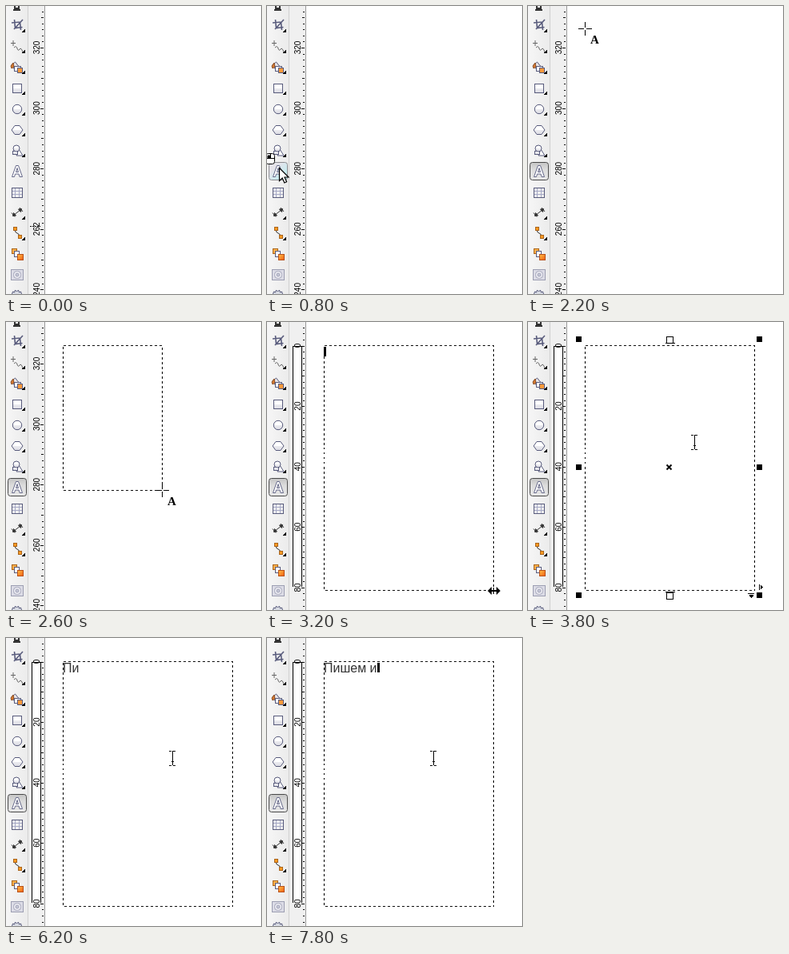
An HTML page for the animation above (8 s loop, 319 by 360 pixels).

```html
<!DOCTYPE html>
<html lang="ru">
<head>
<meta charset="utf-8">
<style>
html, body { margin: 0; width: 100%; height: 100%; overflow: hidden; background: #fff; }
svg { display: block; width: 319px; height: 360px; }
.crisp { shape-rendering: crispEdges; }
.icon { fill: none; stroke: #585b7c; }
.ruler text { font: 10px "Liberation Sans", Arial, sans-serif; text-anchor: middle; }
</style>
</head>
<body>
<svg viewBox="0 0 319 360">
  <defs>
    <linearGradient id="bar"><stop stop-color="#f6f6f6"/><stop offset="1" stop-color="#ebebeb"/></linearGradient>
    <linearGradient id="steel" x2="0" y2="1"><stop offset=".5" stop-color="#fff"/><stop offset=".5" stop-color="#ececf0"/><stop offset="1" stop-color="#dcdce4"/></linearGradient>
    <linearGradient id="orange" x2="1" y2="1"><stop stop-color="#ffc34a"/><stop offset="1" stop-color="#f05a10"/></linearGradient>
    <linearGradient id="hover" x2="1" y2="1"><stop offset=".3" stop-color="#e6e4ea"/><stop offset="1" stop-color="#b4f0f4"/></linearGradient>
    <linearGradient id="pressed" x2="0" y2="1"><stop stop-color="#c4c4c4"/><stop offset=".4" stop-color="#dcdcdc"/><stop offset="1" stop-color="#e8e8e8"/></linearGradient>
  </defs>
  <rect width="319" height="360" fill="#fff"/>
  <g class="crisp">
    <rect width="28" height="360" fill="url(#bar)"/>
    <rect x="27" width="1" height="360" fill="#d0d0d0"/>
    <rect x="28" width="20" height="360" fill="#f0f0f0"/>
    <rect x="48" width="1" height="360" fill="#999"/>
  </g>

  <g id="pageRuler" class="ruler"></g>
  <g id="frameRuler" class="ruler"></g>
  <path id="marker" class="crisp" d="M30 275.5h13" stroke="#000" stroke-dasharray="2 1"/>

  <rect id="toolBox" x="2.5" y="195.5" width="23" height="22" rx="3"/>
  <g class="icon">
    <path d="M11 0v3h5v-3M9 5h9" stroke="#333" stroke-width="2"/>
    <path d="M10.500 17l1 10.500 9-1M7 21l10.500-1 1 10M10 29l11-12" stroke-width="1.600"/>
    <path d="M6 46.500h6M9 43v7M10 52q3-3 4 1t3 1t4 4" stroke="#666"/>
    <path d="M6.500 74l5-4 4 5-5 4z" fill="#e8e4e6"/>
    <path d="M6 75l3-4 1 5-3 2z" fill="#d87a30" stroke="#8a5028"/>
    <rect x="10.500" y="75.500" width="8" height="6" fill="#fff"/>
    <rect x="14.500" y="77.500" width="6" height="6" fill="#ff9a3a"/>
    <rect x="8.500" y="97.500" width="11" height="11" fill="url(#steel)"/>
    <circle cx="14" cy="129" r="5.700" fill="url(#steel)"/>
    <path d="M11 149.500h6l4 5.500-4 5.500h-6l-4-5.500z" fill="url(#steel)"/>
    <path d="M16 179l5 8h-8z" fill="#fff"/>
    <rect x="8.500" y="181.500" width="6" height="4" fill="url(#steel)"/>
    <circle cx="13" cy="178" r="4" fill="url(#steel)"/>
    <path d="M7.500 213.500l5-14h3l5 14h-3.500l-1-3.500h-4.500l-1 3.500zM12.500 207.500h3l-1.500-5z" fill="#fff" stroke="#66698a"/>
    <path class="crisp" d="M7.500 231.500h13M7.500 235.500h13M11.500 228v12M16.500 228v12" stroke="#a6a9c6"/>
    <rect class="crisp" x="7.500" y="227.500" width="13" height="12"/>
    <path d="M9.500 261.500l9-7M7 258.500l4 5M17 252l4 5" stroke="#333"/>
    <path d="M8.500 262.500l1-4 3 3.500zM19.500 253.500l-1 4-3-3.500z" fill="#333" stroke="#333"/>
    <path d="M11 280q1 4 3 4t3 4" stroke="#333"/>
    <rect x="9.500" y="276.500" width="4" height="4" fill="#ff9a22" stroke="#a8641c"/>
    <rect x="15.500" y="286.500" width="4" height="4" fill="#ff9a22" stroke="#a8641c"/>
    <rect x="7.500" y="303.500" width="6" height="6" fill="#ffb04a" stroke="#a8641c"/>
    <rect x="10.500" y="306.500" width="6" height="7" fill="#fff"/>
    <rect x="14.500" y="310.500" width="7" height="7" fill="url(#orange)" stroke="#b85018"/>
    <rect x="6.500" y="329.500" width="15" height="13" fill="#dcdce6" stroke="#9c9eb2"/>
    <rect x="9.500" y="331.500" width="9" height="9" rx="4" fill="#ececf2" stroke="#a4a6ba"/>
    <circle cx="14" cy="336" r="2" fill="#c4c6d6" stroke="#a4a6ba"/>
    <path d="M7.500 360l1-3 2 1 1-3 2 2 2-2 1 3 2-1 1 3" fill="#d9dce4"/>
  </g>
  <g id="flyouts" class="crisp"></g>

  <rect id="frame" class="crisp" x="71.5" y="29.5" fill="none" stroke="#000" stroke-dasharray="3 3"/>
  <g id="handles" class="crisp">
    <path id="corners"/>
    <path d="M173.500 18.500h8v8h-8zM172 26.500h12M173.500 338.500h8v8h-8zM172 337.500h12M289.500 328v7M275 339.500h8M277 341.500h5" fill="#fff" stroke="#000"/>
    <path d="M291 328l3 3.500-3 3.500zM277 342h5l-2.500 3z"/>
    <path d="M173.500 178.500l6 6m0-6l-6 6" stroke="#000" stroke-width="2" shape-rendering="auto"/>
  </g>
  <text id="typed" x="71" y="43" fill="#333" style="font:16px 'Liberation Sans',Arial,sans-serif;white-space:pre"></text>
  <rect id="caret" class="crisp" y="31" width="3" height="12"/>

  <path id="arrow" d="M.5.500v16l3.700-3.500 2.600 6 2.800-1.200-2.600-5.800h5z" fill="#fff" stroke="#000" stroke-width="1.200"/>
  <g id="click" transform="translate(-2 184)" fill="#fff" stroke="#000">
    <rect x=".5" y=".5" width="11" height="13" rx="3"/>
    <path d="M3 6v-3h3v3z" fill="#000"/>
    <path d="M1 6.500h10M6.500 1v5" fill="none"/>
  </g>
  <g id="cross">
    <path class="crisp" d="M-8 .5h7M2 .5h7M.5-8v7M.5 2v7" stroke="#000"/>
    <text x="7" y="19" style="font:bold 15px 'Liberation Serif',serif">A</text>
  </g>
  <g id="resize">
    <path d="M-8 0l5-5v4h6v-4l5 5-5 5v-4h-6v4z"/>
    <path class="crisp" d="M-.5-4v8" stroke="#000"/>
  </g>
  <path id="beam" class="crisp" d="M-4-8.500h3M1-8.500h3M-4 9.500h3M1 9.500h3M.5-9v18M-1 4.500h3" fill="none" stroke="#000"/>
</svg>
<script>
const LOOP = 8000, STEP = 200;
const $ = id => document.getElementById(id);
const show = (id, on) => $(id).style.display = on ? '' : 'none';

function place(id, point) {
  show(id, point);
  if (point) $(id).setAttribute('transform', `translate(${point})`);
}

function buildRuler(id, top, labels) {
  const pitch = 75.6;
  let ticks = '', text = '';
  for (let i = -10; i <= 50; i++) {
    const y = Math.round(top + i * pitch / 10) + .5;
    const length = i % 10 === 0 ? 5 : i % 5 === 0 ? 4 : 3;
    if (y > 0 && y < 360) ticks += `M${48 - length} ${y}h${length - 1}`;
  }
  labels.forEach((label, i) => {
    const y = top + i * pitch;
    text += `<text transform="translate(42 ${y}) rotate(-90)">${label}</text>`;
  });
  $(id).innerHTML += `<path class="crisp" d="${ticks}" stroke="#000"/>${text}`;
}
buildRuler('pageRuler', 52, [320, 300, 280, 260, 240]);
$('frameRuler').innerHTML =
  '<path class="crisp" d="M32.5 331V30.5H43.5V331" fill="#fff" stroke="#000"/>';
buildRuler('frameRuler', 29.5, [0, 20, 40, 60, 80]);

$('flyouts').innerHTML = [33, 59, 85, 111, 137, 163, 189, 267, 293]
  .map(y => `<path d="M24 ${y - 5}v5h-5z"/>`).join('');
$('corners').setAttribute('d', [18, 178, 338]
  .flatMap(y => [60, 286].map(x => `M${x} ${y}h7v7h-7z`)).join(''));

// Each list holds [start time, value]; a value lasts until the next entry.
const at = (list, t) => list.reduce((value, [start, next]) => t >= start ? next : value, null);

const arrowKeys = [[200, [44, 338]], [400, [30, 262]], [600, [15, 202]], [1400, null]];
const crossKeys = [[1400, [120, 170]], [1600, [177, 110]], [1800, [140, 60]], [2000, [85, 33]],
  [2200, [71, 28]], [2400, [100, 70]], [2600, [195, 210]], [2800, [283, 335]], [3200, null]];
const beamKeys = [[3400, [262, 285]], [3600, [225, 192]], [3800, [208, 150]]];
const textKeys = [[0, ''], [5400, 'П'], [5800, 'Пи'], [7000, 'Пиш'], [7200, 'Пише'],
  [7400, 'Пишем'], [7600, 'Пишем '], [7800, 'Пишем и']];
const caretKeys = [[3200, true], [3800, false], [4400, true], [5000, false],
  [5400, true], [6200, false], [6800, true]];

function draw(now) {
  const t = Math.floor(now % LOOP / STEP) * STEP;
  const cross = at(crossKeys, t);
  const framed = t >= 3200;

  place('arrow', at(arrowKeys, t));
  place('cross', cross);
  place('resize', t === 3200 && [284, 336]);
  place('beam', at(beamKeys, t));
  show('click', t === 800);
  show('marker', t < 200);

  const box = $('toolBox');
  const pressed = t >= 1000;
  show('toolBox', t >= 600);
  box.setAttribute('fill', pressed ? 'url(#pressed)' : 'url(#hover)');
  box.setAttribute('stroke', pressed ? '#484848' : '#8c8c90');

  show('pageRuler', !framed);
  show('frameRuler', framed);
  $('pageRuler').querySelectorAll('text')[3].textContent = t < 200 ? '262' : '260';

  show('frame', t >= 2400);
  const [right, bottom] = t < 2800 && cross || [283, 335];
  $('frame').setAttribute('width', Math.max(0, right - 71));
  $('frame').setAttribute('height', Math.max(0, bottom - 29));
  show('handles', t >= 3400 && t < 5400);

  const typed = at(textKeys, t);
  $('typed').textContent = typed;
  show('caret', at(caretKeys, t));
  $('caret').setAttribute('x', Math.round(71 + (typed ? $('typed').getComputedTextLength() : 0)));
}

const begin = performance.now();
function tick() {
  draw(performance.now() - begin);
  requestAnimationFrame(tick);
}
tick();
</script>
</body>
</html>
```
